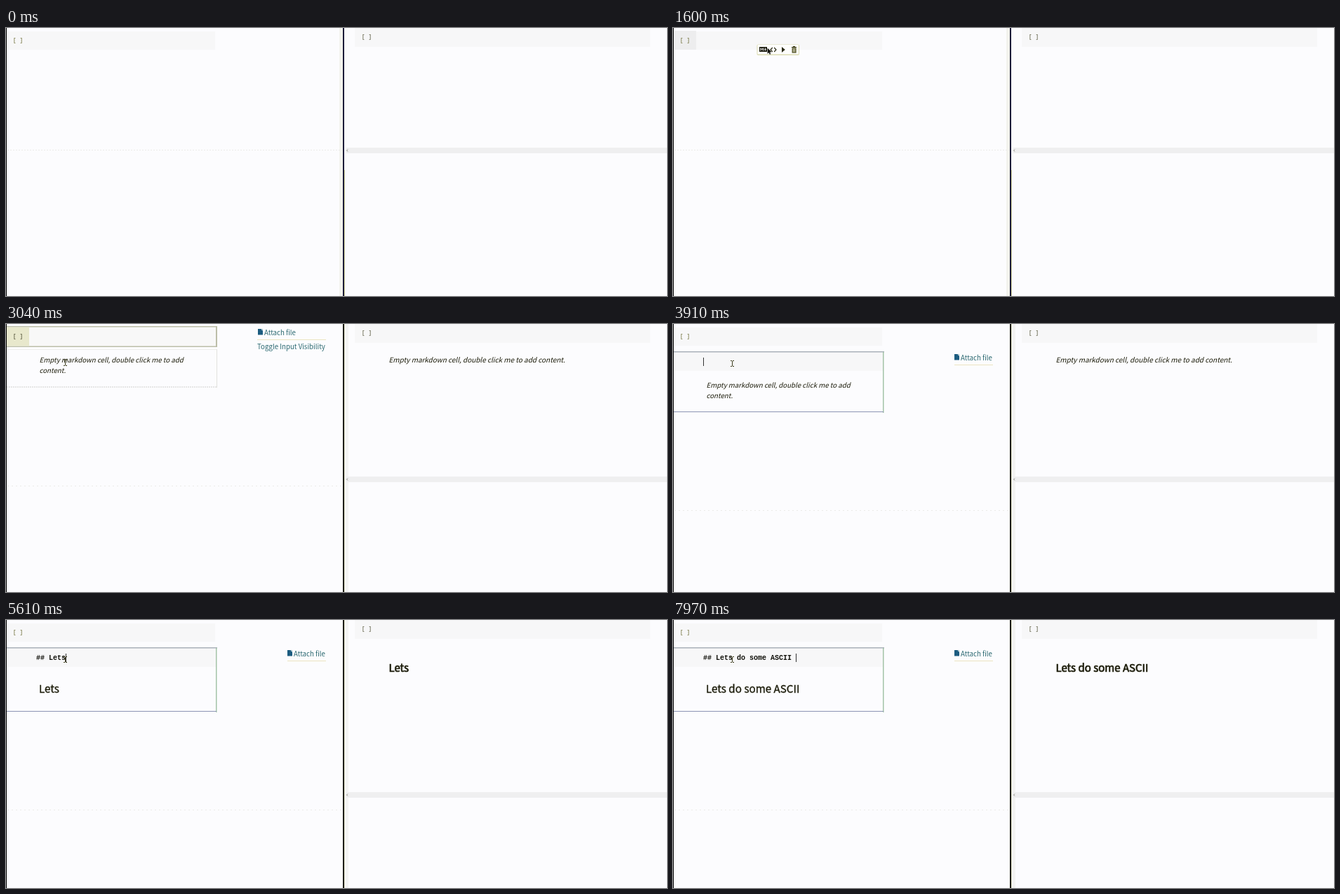
These frames come from a looping animation (942 by 383 pixels, 7.99 s). An HTML page with a canvas:

```html
<!DOCTYPE html>
<html lang="en">
<head>
<meta charset="utf-8">
<title>Notebook cells</title>
<style>
html, body { margin: 0; width: 100%; height: 100%; overflow: hidden; background: #fcfcfe; }
canvas { display: block; }
</style>
</head>
<body>
<canvas id="stage" width="942" height="383"></canvas>
<script>
const ctx = document.getElementById('stage').getContext('2d');
const LOOP = 7990;
const SANS = '"Noto Sans CJK JP", "Noto Sans CJK SC", "Noto Sans CJK", "Noto Sans", sans-serif';
const MONO = '"Noto Sans Mono", "DejaVu Sans Mono", monospace';
const CODE = '"Liberation Mono", monospace';
const PAPER = '#fcfcfe', CELL = '#f7f7f8', INK = '#1c1c0a', LINK = '#2a6870';

const HOVER = 640, TOOLTIP = 1900, CREATED = 2560, EDIT = 3880, LAG = 130;
const HINT = 'Empty markdown cell, double click me to add';
const TYPED = '## Lets do some ASCII ';
const KEYS = [4470, 4620, 4800, 5100, 5260, 5360, 5470, 5800, 5880, 5960, 6040,
  6130, 6230, 6310, 6400, 6470, 6610, 7300, 7440, 7580, 7700, 7830];

// Pointer stops: time, x, y
const PATH = [[40, 230, -14], [760, 164, 36], [950, 164, 36], [1250, 150, 24], [1560, 136, 28],
  [1720, 128, 32], [2560, 128, 32], [3000, 85, 55], [3350, 85, 56]];

const typedAt = t => TYPED.slice(0, KEYS.filter(k => k <= t).length);
const heading = s => s.slice(3).trimEnd();

function rect(x, y, w, h, color) {
  ctx.fillStyle = color;
  ctx.fillRect(x, y, w, h);
}

function text(s, x, y, font, color, weight = 0) {
  ctx.font = font;
  ctx.fillStyle = color;
  ctx.fillText(s, x, y);
  if (weight) {
    ctx.strokeStyle = color;
    ctx.lineWidth = weight;
    ctx.lineJoin = 'round';
    ctx.strokeText(s, x, y);
  }
}

function poly(points, fill, stroke, width = 1) {
  ctx.beginPath();
  points.forEach(([x, y]) => ctx.lineTo(x, y));
  if (fill) {
    ctx.fillStyle = fill;
    ctx.fill();
  }
  if (stroke) {
    ctx.strokeStyle = stroke;
    ctx.lineWidth = width;
    ctx.lineJoin = 'miter';
    ctx.stroke();
  }
}

function dashes(x1, y1, x2, y2, color, gap) {
  ctx.save();
  ctx.setLineDash([2, gap]);
  poly([[x1, y1], [x2, y2]], null, color);
  ctx.restore();
}

function rounded(x, y, w, h, r, color) {
  ctx.fillStyle = color;
  ctx.beginPath();
  ctx.roundRect(x, y, w, h, r);
  ctx.fill();
}

function pointerAt(t) {
  const i = PATH.findIndex(p => p[0] > t);
  if (i === 0) return PATH[0].slice(1);
  if (i < 0) return PATH[PATH.length - 1].slice(1);
  const [a, b] = [PATH[i - 1], PATH[i]];
  const u = (t - a[0]) / (b[0] - a[0]);
  const e = u * u * (3 - 2 * u);
  return [a[1] + (b[1] - a[1]) * e, a[2] + (b[2] - a[2]) * e];
}

function arrow(x, y) {
  const shape = [[0, 0], [0, 8], [1.9, 6.3], [3.2, 9.2], [4.5, 8.6], [3.3, 5.8], [5.8, 5.6], [0, 0]];
  const points = shape.map(([dx, dy]) => [x + dx, y + dy]);
  poly(points, '#111108', '#ffffff', 0.8);
  poly(points, '#111108');
}

function beam(x, y) {
  const cx = Math.round(x), cy = Math.round(y);
  rect(cx - 1, cy - 3, 1, 7, '#3c3c1c');
  rect(cx - 3, cy - 4, 2, 1, '#3c3c1c');
  rect(cx, cy - 4, 2, 1, '#3c3c1c');
  rect(cx - 3, cy + 4, 2, 1, '#3c3c1c');
  rect(cx, cy + 4, 2, 1, '#3c3c1c');
}

function toolbar() {
  rounded(119.5, 23.5, 60.5, 15.5, 2, '#dcdcb4');
  rounded(120.5, 24, 58.5, 13.5, 1, '#fefefc');
  rect(123, 27, 11, 7, '#1c1c10');
  poly([[125, 32.5], [125, 28.8], [126.7, 30.8], [128.4, 28.8], [128.4, 32.5]], null, '#fff', 1);
  poly([[129.7, 30.4], [133.1, 30.4], [131.4, 32.6]], '#fff');
  rect(130.9, 28.5, 1, 2, '#fff');
  poly([[141.8, 28], [139, 31], [141.8, 34]], null, '#2a2a14', 1.2);
  poly([[144.2, 28], [147, 31], [144.2, 34]], null, '#2a2a14', 1.2);
  poly([[155, 27], [159.8, 31], [155, 35]], '#2a2a14');
  rect(169, 27, 7, 1.2, '#3a3a14');
  rect(171, 26, 3, 1, '#3a3a14');
  rect(169.6, 28.6, 6, 7, '#4a4a1c');
  [170.8, 172.2, 173.6].forEach(x => rect(x, 29.5, 0.7, 5, '#f0f0dc'));
}

function tooltip() {
  rounded(129.5, 42, 63, 15, 2.5, '#303034');
  ctx.textAlign = 'center';
  text('Create Text Cell', 161, 52, `6.9px ${SANS}`, '#e8e8dc');
  ctx.textAlign = 'left';
}

function attach(x, y) {
  poly([[x, y - 5], [x + 4.5, y - 5], [x + 7, y - 2.5], [x + 7, y + 3.5], [x, y + 3.5]], '#1c5c80');
  rect(x + 5, y - 5, 2, 2, '#a8c4cc');
  text('Attach file', x + 9, y + 4, `9.7px ${SANS}`, LINK);
}

function panels(t, line, split) {
  const early = t < CREATED;
  rect(0, 0, 942, 383, PAPER);
  if (early) rect(475, 0, 5, 383, '#f3f3ee');
  else rect(483, 0, 5, 383, '#f4f4f3');
  dashes(2, line + 0.5, 479, line + 0.5, '#ebebe8', early ? 2 : 4);
  rect(485, split, 457, 8, '#efeff0');
  poly([[487, split + 2.5], [485.5, split + 4], [487, split + 5.5]], null, '#777766', 0.8);
  rect(0, 0, 1, 383, '#000');
  rect(480, 0, 2, 383, early ? '#1c1c38' : INK);
  rect(482, early ? 203 : 0, 1, early ? 180 : 383, early ? '#dcdca4' : '#e8e8d4');
  rect(497, 0, 421, 27, CELL);
  text('[ ]', 506.5, 15.7, `8.4px ${MONO}`, '#4c4c30');
}

function firstCell(t) {
  const selected = t >= CREATED && t < EDIT;
  if (selected) {
    rect(1, 3, 300, 30, '#bcbea8');
    rect(1, 4.5, 298, 27, '#f8f8f8');
    rect(1, 4.5, 32, 27, '#e8e8cc');
  } else {
    rect(1, 5, 297, 26, CELL);
    if (t >= HOVER && t < CREATED) rect(1, 4, 32, 27, '#ededee');
  }
  text('[ ]', 9.5, 20.8, `8.4px ${MONO}`, selected ? '#3c3c24' : '#66662c');
}

function hint(y) {
  const font = `italic 9.7px ${SANS}`;
  text(HINT, 47.5, y, font, INK);
  text('content.', 47.5, y + 15, font, INK);
}

function previewCell() {
  rect(1, 36, 300, 1, '#ededea');
  rect(300, 36, 1, 55, '#e2e2de');
  dashes(1, 90, 301, 90, '#cfcfcc', 1);
  hint(55);
  attach(359, 12);
  rect(358, 22, 98, 1, '#ebe4c0');
  text('Toggle Input Visibility', 358, 36, `9.7px ${SANS}`, LINK);
}

function editor(typed, bottom) {
  rect(1, 41, 298, 26, CELL);
  rect(1, 39, 300, 1.5, '#a8b0b8');
  rect(299, 40, 1.5, bottom - 39, '#a4c4a8');
  rect(1, bottom - 1, 299, 1, '#8c94b4');
  text(typed, 43, 57, `bold 10px ${CODE}`, '#10100a');
  rect(43 + typed.length * 6, 48, 1, 12, '#333');
  if (typed) text(heading(typed), 47, 104, `15.2px ${SANS}`, INK, 0.35);
  else hint(91);
  attach(401, 48);
  rect(401, 58, 55, 1, '#ebe4c0');
}

function draw(t) {
  const typed = typedAt(t), mirrored = typedAt(t - LAG);
  const created = t >= CREATED, editing = t >= EDIT;
  const synced = t >= CREATED + LAG;
  const bottom = !typed ? 126 : heading(typed) ? 131 : 95;
  const line = !created ? 174 : editing ? bottom + 140 : 231;
  const split = !synced ? 171 : !mirrored ? 218 : heading(mirrored) ? 246 : 209;

  panels(t, line, split);
  firstCell(t);
  if (editing) editor(typed, bottom);
  else if (created) previewCell();

  if (mirrored) text(heading(mirrored), 545.5, 74, `15px ${SANS}`, INK, 0.7);
  else if (synced) text(HINT + ' content.', 545.5, 55, `italic 9.95px ${SANS}`, INK);

  if (t >= HOVER && !created) toolbar();
  if (t >= TOOLTIP && !created) tooltip();

  const [x, y] = pointerAt(t);
  if (t >= 2800) beam(x, y);
  else arrow(x, y);
}

function tick() {
  draw(performance.now() % LOOP);
  requestAnimationFrame(tick);
}
tick();
</script>
</body>
</html>
```
